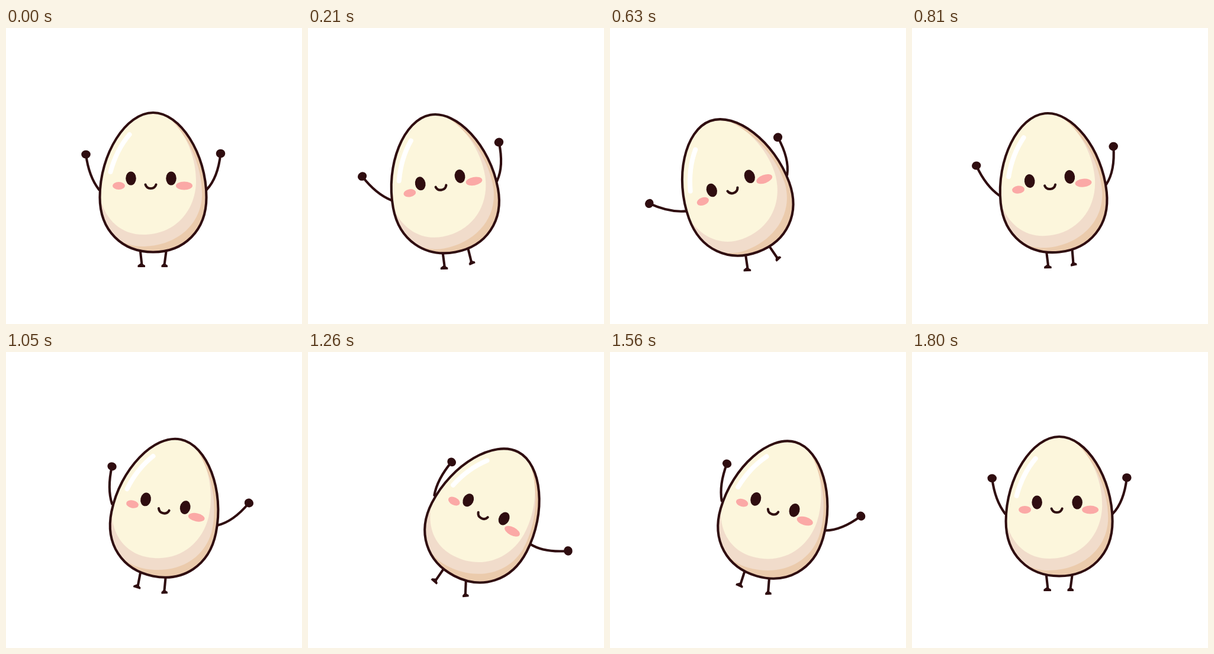
Write an HTML page without scripts that moves like this. It is 500 px wide and 500 px high and loops after 1830 ms.

```html
<!DOCTYPE html>
<html lang="en">
<head>
<meta charset="utf-8">
<title>Rocking egg</title>
<style>
@property --tilt { syntax: "<angle>"; inherits: true; initial-value: 0deg; }
html, body { margin: 0; width: 100%; height: 100%; overflow: hidden; background: #fff; }
svg { display: block; width: 100%; height: 100%; }

/* One tilt angle drives the body and every limb. */
.egg { animation: rock 1830ms infinite; transform: rotate(var(--tilt)); transform-origin: 248.5px 375px; }
@keyframes rock {
  0%      { --tilt: 0deg; animation-timing-function: cubic-bezier(.37, 0, .63, 1); }
  26.23%  { --tilt: -25.8deg; animation-timing-function: cubic-bezier(.333, 0, .667, .58); }
  44.26%  { --tilt: -6deg; animation-timing-function: cubic-bezier(.333, .31, .667, .64); }
  58.2%   { --tilt: 12.7deg; animation-timing-function: cubic-bezier(.333, .475, .667, 1); }
  73.22%  { --tilt: 29.25deg; animation-timing-function: cubic-bezier(.333, 0, .667, .462); }
  85.25%  { --tilt: 16.3deg; animation-timing-function: cubic-bezier(.333, .495, .667, 1); }
  99.18%, 100% { --tilt: 0deg; }
}

/* The limb on the leaning side swings differently from the other one. */
.arm-l { transform: rotate(min(.75 * var(--tilt), 1.9 * var(--tilt))); transform-origin: 156.5px 271px; }
.arm-r { transform: rotate(max(.75 * var(--tilt), 1.9 * var(--tilt))); transform-origin: 339.5px 271px; }
.leg-l { transform: rotate(max(.5 * var(--tilt), -.9 * var(--tilt))); transform-origin: 227px 378px; }
.leg-r { transform: rotate(min(1.1 * var(--tilt), -1.2 * var(--tilt))); transform-origin: 270px 378px; }

.line { fill: none; stroke: #2f0d10; stroke-width: 4.1; stroke-linecap: round; stroke-linejoin: round; }
.dark { fill: #2f0d10; }
.blush { fill: #fba9a6; }
</style>
</head>
<body>
<svg viewBox="0 0 500 500">
  <defs>
    <path id="shell" d="M248.5 143C294 143 338.5 212 338.5 286C338.5 342 301 378.5 248.5 378.5C196 378.5 158.5 342 158.5 286C158.5 212 203 143 248.5 143Z"/>
    <clipPath id="inside"><use href="#shell"/></clipPath>
  </defs>
  <g class="egg">
    <g class="arm-l">
      <path class="line" d="M157 273Q140 251 135 214"/>
      <ellipse class="dark" cx="135" cy="213.5" rx="7.8" ry="7"/>
    </g>
    <g class="arm-r">
      <path class="line" d="M339 273Q358 253 362.5 212"/>
      <ellipse class="dark" cx="362.5" cy="212" rx="7.8" ry="7.3"/>
    </g>
    <g class="leg-l">
      <path class="line" d="M227 378L229.5 400"/>
      <path class="dark" d="M228 397L222.5 401V404H235V401Z"/>
    </g>
    <g class="leg-r">
      <path class="line" d="M270.5 378L267.5 400"/>
      <path class="dark" d="M267 397L262.500 401V404H273V401Z"/>
    </g>

    <g clip-path="url(#inside)">
      <rect x="150" y="135" width="200" height="250" fill="#ebcbac"/>
      <path fill="#f1dccb" d="M255 140C310 170 333 240 331 285C328 335 285 369 230 369C195 369 172 347 150 315V120Z"/>
      <path fill="#fcf6dc" d="M262 143C300 165 322 215 321 262C319 310 285 349 232 349C195 349 168 325 158 285L150 120Z"/>
    </g>
    <use href="#shell" class="line"/>

    <path d="M208.5 180Q186.5 206 176.5 243" fill="none" stroke="#fff" stroke-width="8" stroke-linecap="round"/>
    <ellipse class="blush" cx="190.5" cy="266.5" rx="10.5" ry="6.5"/>
    <ellipse class="blush" cx="301" cy="266.5" rx="14" ry="7"/>
    <ellipse class="dark" cx="211" cy="254" rx="8.8" ry="11.5"/>
    <ellipse class="dark" cx="279" cy="254" rx="8.8" ry="11.5"/>
    <path class="line" stroke-width="4.6" d="M235.5 264.5Q237.500 271 244.500 271T253.500 264.500"/>
  </g>
</svg>
</body>
</html>
```
